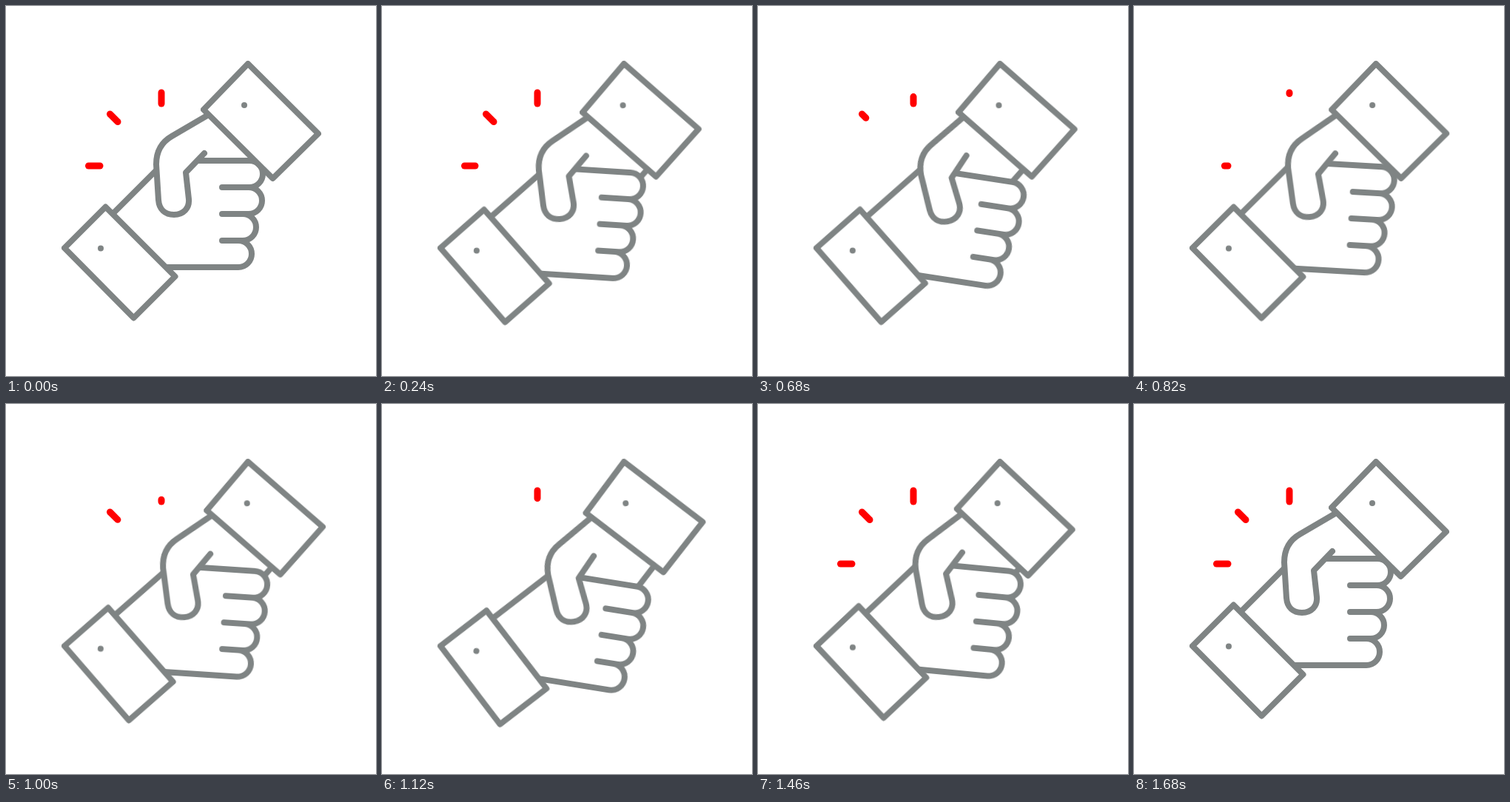
These frames come from a looping animation (500 px wide and 500 px high, 1840 ms). An HTML page without scripts:

```html
<!DOCTYPE html>
<html lang="en">
<head>
<meta charset="utf-8">
<title>Handshake</title>
<style>
  html, body { margin: 0; width: 100%; height: 100%; overflow: hidden; background: #fff; }
  svg { display: block; width: 100%; height: 100%; }
  .line { fill: #fff; stroke: #7f8484; stroke-width: 8; stroke-linecap: round; stroke-linejoin: round; }
  .dot { fill: #7f8484; stroke: none; }

  /* --s is the direction and strength of each turn */
  .left { --s: 1; }
  .right { --s: -1; }
  .right.hand { --s: -1.3; }
  .arm { animation: swing 1840ms infinite; }
  .hand { animation: flex 1840ms infinite; }
  .left.arm { transform-origin: 79px 327px; }
  .right.arm { transform-origin: 327px 78px; }
  .left.hand { transform-origin: 194px 312px; }
  .right.hand { transform-origin: 272px 148px; }

  @keyframes swing {
    0% { transform: rotate(0deg); animation-timing-function: ease-in-out; }
    26.63% { transform: rotate(calc(var(--s) * 7.5deg)); animation-timing-function: ease-in-out; }
    46.74% { transform: rotate(0deg); animation-timing-function: ease-in-out; }
    61.96% { transform: rotate(calc(var(--s) * 7.5deg)); animation-timing-function: cubic-bezier(.3, 0, .5, 1); }
    90.22%, 100% { transform: rotate(0deg); }
  }
  @keyframes flex {
    0%, 13.04% { transform: rotate(0deg); animation-timing-function: ease-in-out; }
    36.96% { transform: rotate(calc(var(--s) * 5.2deg)); animation-timing-function: ease-in-out; }
    54.35% { transform: rotate(0deg); animation-timing-function: ease-in-out; }
    71.74% { transform: rotate(calc(var(--s) * 5.6deg)); animation-timing-function: ease-in-out; }
    91.3%, 100% { transform: rotate(0deg); }
  }

  .spark { fill: none; stroke: #f00; stroke-width: 9; stroke-linecap: round;
    stroke-dasharray: 100 300; animation: shoot 1840ms var(--d, 0ms) linear infinite; }

  /* 104 is hidden before the inner end, -104 past the outer end */
  @keyframes shoot {
    0%, 12.77% { stroke-dashoffset: 0; }
    17.93% { stroke-dashoffset: -104; animation-timing-function: step-end; }
    23.37% { stroke-dashoffset: 104; }
    28.53%, 28.8% { stroke-dashoffset: 0; }
    35.2% { stroke-dashoffset: -104; animation-timing-function: step-end; }
    42.93% { stroke-dashoffset: 104; }
    48.1%, 49.18% { stroke-dashoffset: 0; }
    54.08% { stroke-dashoffset: -104; animation-timing-function: step-end; }
    63.6% { stroke-dashoffset: 104; }
    68.75%, 100% { stroke-dashoffset: 0; }
  }
</style>
</head>
<body>
<svg viewBox="0 0 500 500">
  <path class="spark" pathLength="100" d="M127 216H111.5"/>
  <path class="spark" pathLength="100" style="--d: 95ms" d="M151 156.5L140.5 146"/>
  <path class="spark" pathLength="100" style="--d: 190ms" d="M210 132V117"/>

  <g class="line">
    <path class="right arm" d="M355 217L326 246"/>
    <g class="left arm">
      <path d="M140 285L211 214"/>
      <path class="left hand" d="M238 209H329a18 18 0 0 1 0 36H292
        M292 245H328a18 18 0 0 1 0 36H292
        M292 281H320a18 18 0 0 1 0 36H292
        M292 317H314a18 18 0 0 1 0 36H207"/>
    </g>
    <g class="right arm">
      <path class="right hand" d="M277 145L224 176Q203 188 203 214L206 262C207 275 215 282 227 282
        C240 282 248 273 247 261L243 225L268 199"/>
      <path d="M327 78L422 172.500L360.500 233L267 140Z"/>
      <circle class="dot" cx="322" cy="134" r="4"/>
    </g>
    <g class="left arm">
      <path d="M79 327L134.500 271.500L228.500 365.500L172.500 421.500Z"/>
      <circle class="dot" cx="128" cy="327.500" r="4"/>
    </g>
  </g>
</svg>
</body>
</html>
```
